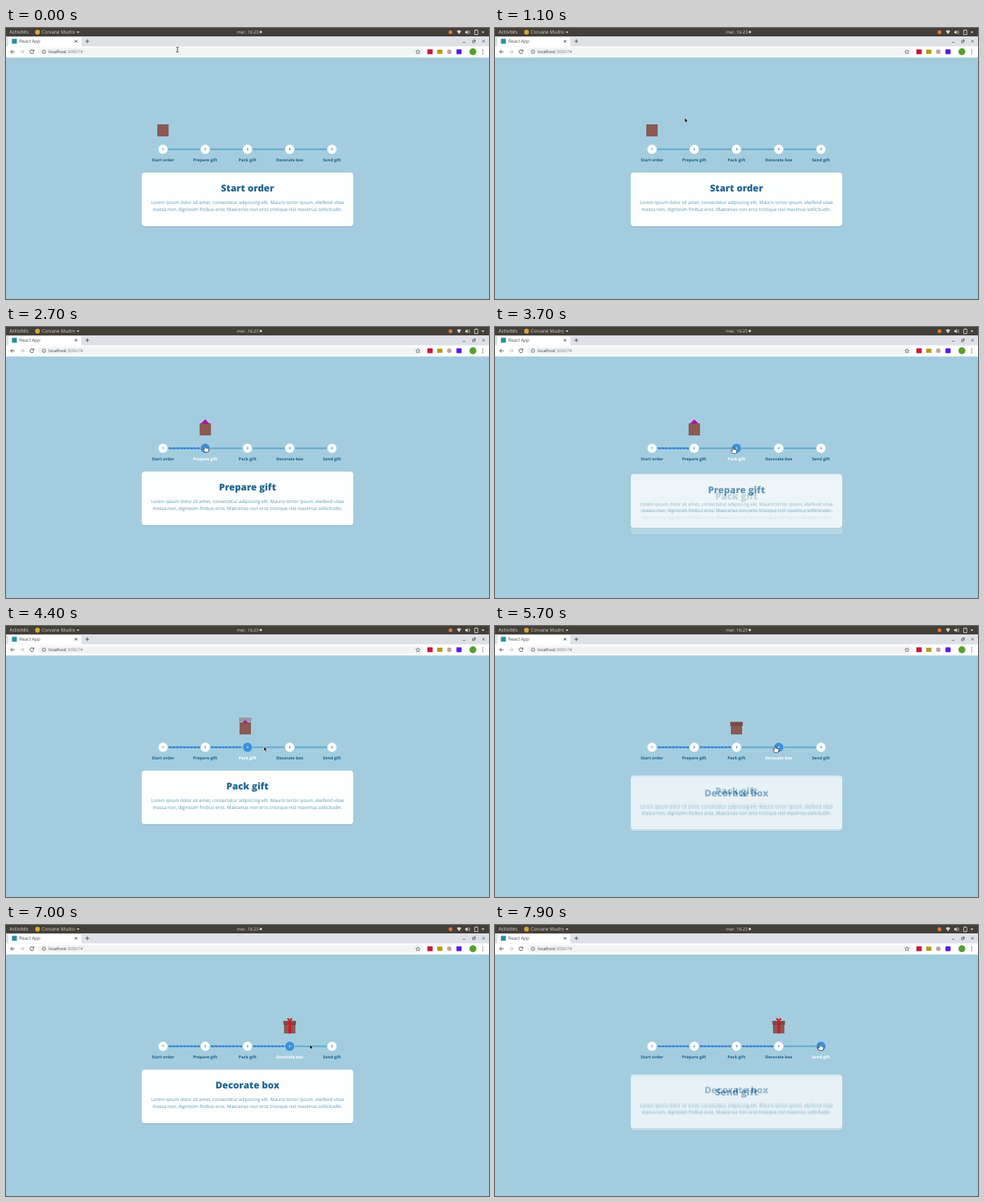
Recreate the animation shown at these times as an HTML page. Size 690 px wide and 388 px high, loop 8000 ms.

```html
<!DOCTYPE html>
<html lang="fr">
<head>
<meta charset="utf-8">
<title>Gift stepper</title>
<style>
  html, body { margin: 0; width: 100%; height: 100%; overflow: hidden; background: #a3cddf; }
  svg { display: block; width: 690px; height: 388px; }
  text { font-family: "Open Sans", "Noto Sans", sans-serif; text-rendering: geometricPrecision; }
  .mid { text-anchor: middle; }
  .panel { fill: #dfdbd2; font-size: 6.7px; font-weight: 500; }
  .title { font-size: 13.4px; font-weight: 800; fill: #226690; }
  .body { font-size: 6.55px; fill: #5795b3; }
  .label { font-size: 5.9px; font-weight: 700; fill: #1f6089; }
  .num { font-size: 4.6px; font-weight: 700; fill: #3f7c9c; }
  .dot { fill: #fdfefe; }
  .on .dot { fill: #3991e0; }
  .on .label { fill: #fff; }
  .on .num { fill: #dcecf8; }
  .line { fill: none; stroke: #4f5256; stroke-width: 1; }
</style>
</head>
<body>
<svg viewBox="0 0 690 388">
  <defs>
    <pattern id="stripes" width="5" height="4" patternUnits="userSpaceOnUse" patternTransform="skewX(35)">
      <rect width="5" height="4" fill="#2f80d0"/>
      <rect width="2" height="4" fill="#66a8e2"/>
    </pattern>
    <filter id="shadow" x="-5%" y="-10%" width="110%" height="125%">
      <feDropShadow dx="0" dy=".8" stdDeviation=".6" flood-color="#1d4d68" flood-opacity=".35"/>
    </filter>
  </defs>

  <rect width="690" height="388" fill="#a3cddf"/>

  <!-- desktop panel -->
  <rect width="690" height="12" fill="#433f39"/>
  <text class="panel" x="5" y="8.4" style="font-size:7px">Activités</text>
  <circle cx="45" cy="6" r="3.4" fill="#d9a52f"/>
  <text class="panel" x="51" y="8.4" style="font-size:6.6px">Corvane Mudro</text>
  <path d="M101 5h4l-2 2.6z" fill="#dfdbd2"/>
  <text class="panel" x="330" y="8.3" style="font-size:6.2px">mer. 16:23</text>
  <circle cx="364" cy="5.8" r="1.7" fill="#dfdbd2"/>
  <circle cx="635" cy="6" r="2.7" fill="#e8762c"/>
  <path d="M644 4.6a4.4 4.4 0 0 1 6.4 0L647.2 9z" fill="#d6d2ca"/>
  <path d="M656 4.8h1.5l2-1.8v6l-2-1.8H656z" fill="#dfdbd2"/>
  <path d="M660.6 4.2q1.3 1.8 0 3.6M661.8 3.2q2 2.8 0 5.6" fill="none" stroke="#dfdbd2" stroke-width=".6"/>
  <path d="M669.5 3.2h4.6v6.3h-4.6zM671 2.3h1.6" fill="none" stroke="#dfdbd2" stroke-width=".9"/>
  <path d="M679.3 5h4l-2 2.6z" fill="#dfdbd2"/>

  <!-- tab strip -->
  <rect y="12" width="690" height="14.2" fill="#dee1e6"/>
  <path d="M1 26.2q2.5 0 2.5-2.5V15.500q0-2.500 2.500-2.500H105q2.500 0 2.500 2.500v8.200q0 2.500 2.500 2.500z" fill="#fff"/>
  <rect x="8.500" y="15.500" width="7" height="7" fill="#2390a3"/>
  <text x="19" y="21.300" font-size="6.400" fill="#45494d">React App</text>
  <path class="line" d="M98.300 17.200l3.500 3.500m0-3.500l-3.500 3.500M113.500 19h5.400M116.200 16.300v5.400" stroke-width=".9"/>
  <path class="line" d="M652.500 20.500h3.600M666.500 18.200h2.800v2.800h-2.800zM667.700 17h2.800v2.800M680.400 17.200l3.500 3.500m0-3.500l-3.500 3.500" style="stroke-width:.8"/>

  <!-- toolbar -->
  <rect y="26.200" width="690" height="16" fill="#fff"/>
  <rect y="41.800" width="690" height=".5" fill="#d5dbde"/>
  <rect x="46" y="28.400" width="551" height="11.200" rx="5.600" fill="#f1f3f4"/>
  <path class="line" d="M12.300 34H6.700m2.600-2.700L6.700 34l2.600 2.700"/>
  <path class="line" d="M20.200 34h5.600m-2.600-2.700l2.600 2.700-2.600 2.700" style="stroke:#babcbe"/>
  <path class="line" d="M39.300 32.400a2.700 2.700 0 1 0 .4 2.200M39.800 30.900v2.200h-2.200"/>
  <circle class="line" cx="54.200" cy="34" r="2.500" style="stroke-width:.7"/>
  <path class="line" d="M54.200 33.700v1.600M54.200 32.400v.6" style="stroke-width:.7"/>
  <text x="61" y="36.200" font-size="6" fill="#303338">localhost<tspan fill="#7b7f84">:3000/?#</tspan></text>
  <path class="line" d="M588.500 31l.9 2 2.200.2-1.700 1.500.5 2.200-1.900-1.200-1.900 1.200.5-2.200-1.700-1.500 2.200-.2z" style="stroke-width:.7"/>
  <rect x="602" y="30.500" width="7.500" height="7" fill="#c5173f"/>
  <rect x="616" y="31" width="7.500" height="6" fill="#b79c16"/>
  <circle cx="633.300" cy="34" r="3.200" fill="#c3a2a0"/>
  <rect x="643.500" y="30.500" width="7.300" height="7" rx="1" fill="#5a18e6"/>
  <circle cx="667" cy="34" r="4.900" fill="#57a02c"/>
  <g fill="#55585c">
    <circle cx="681" cy="31.300" r=".8"/><circle cx="681" cy="34" r=".8"/><circle cx="681" cy="36.700" r=".8"/>
  </g>

  <!-- page -->
  <g id="gift">
    <path id="gem" d="M0 132.300l5.800 5.700-5.800 5.700-5.800-5.700z" fill="#bd08c2"/>
    <rect x="-7.600" y="138.300" width="15.200" height="16.500" fill="#8d5950" stroke="#754740" stroke-width=".7"/>
    <rect id="lid" x="-8.600" y="137.700" width="17.200" height="5" fill="#7d4a45" stroke="#6a3e3b" stroke-width=".5"/>
    <g id="ribbon" fill="#d5152c">
      <rect x="-1.900" y="137.400" width="3.800" height="17.900"/>
      <path d="M0 138l-3.400-2.400q-1-2 1-2.300Q-.6 133.300 0 136q.6-2.700 2.400-2.700 2 .3 1 2.300z"/>
    </g>
  </g>
  <g id="bars"></g>
  <g id="steps"></g>
  <g id="cards"></g>

  <g id="cursor" stroke-linejoin="round">
    <path d="M-1.700-3.500Q0-3.500 0-2.500 0-3.500 1.700-3.500M0-2.500v5M-1.700 3.500Q0 3.500 0 2.500 0 3.500 1.700 3.500" fill="none" stroke="#222" stroke-width=".9"/>
    <path d="M0 0v7l1.600-1.500 1.200 2.600 1.200-.6-1.200-2.500H5z" fill="#111" stroke="#fff" stroke-width=".6"/>
    <path d="M-.8 0Q0-.8.8 0V3l4 .9q.8.300.6 1.200L4.600 9H-.6L-3 5.600q-.2-1 .8-.9l1.400.9z" fill="#fff" stroke="#222" stroke-width=".7"/>
  </g>
</svg>
<script>
const LOOP = 8000, CARD_MS = 200, SHIFT = 16.5;
const NAMES = ['Start order', 'Prepare gift', 'Pack gift', 'Decorate box', 'Send gift'];
const CLICKS = [1612, 3668, 5650, 7850];
// time, x, y of the pointer's hot spot
const PATH = [
  [400, 245, 31], [1500, 282, 170], [2600, 282, 170], [3400, 340, 172], [3850, 340, 172],
  [4400, 368.5, 172.5], [4800, 400, 172], [6600, 400, 172], [7000, 434, 171], [7400, 464, 170.5]
];

const $ = id => document.getElementById(id);
const clamp = v => Math.min(1, Math.max(0, v));
const mix = (a, b, p) => a + (b - a) * p;
const stepX = i => 224.3 + 60.35 * i;
const smooth = p => p * p * (3 - 2 * p);
const show = (el, on) => el.setAttribute('visibility', on ? 'visible' : 'hidden');

// cubic-bezier(.25, .1, .25, 1)
function ease(x) {
  if (x <= 0 || x >= 1) return clamp(x);
  const bez = (a, b, s) => 3 * a * s * (1 - s) ** 2 + 3 * b * s * s * (1 - s) + s ** 3;
  let lo = 0, hi = 1;
  for (let i = 0; i < 20; i++) {
    const s = (lo + hi) / 2;
    if (bez(.25, .25, s) < x) lo = s; else hi = s;
  }
  return bez(.1, 1, lo);
}

$('steps').innerHTML = NAMES.map((name, i) => `<g>
  <circle class="dot" cx="${stepX(i)}" cy="173.700" r="6.600"/>
  <text class="num mid" x="${stepX(i)}" y="175.400">${i + 1}</text>
  <text class="label mid" x="${stepX(i)}" y="191.400">${name}</text></g>`).join('');

$('bars').innerHTML = CLICKS.map((_, i) => {
  const box = `x="${stepX(i) + 7.4}" y="172.400" height="2.600"`;
  return `<rect ${box} width="45.600" fill="#69afd0"/><rect class="fill" ${box} fill="url(#stripes)"/>`;
}).join('');

$('cards').innerHTML = NAMES.map(name => `<g>
  <rect x="194" y="207" width="302" height="77" rx="4.200" fill="#fdfefe" filter="url(#shadow)"/>
  <text class="title mid" x="345" y="234">${name}</text>
  <text class="body mid" x="345" y="252.300">Lorem ipsum dolor sit amet, consectetur adipiscing elit. Mauris tortor ipsum, eleifend vitae</text>
  <text class="body mid" x="345" y="261.700">massa non, dignissim finibus eros. Maecenas non eros tristique nisl maximus sollicitudin.</text></g>`).join('');

const steps = [...$('steps').children];
const cards = [...$('cards').children];
const fills = [...document.querySelectorAll('.fill')];
const shapes = [...$('cursor').children];

function pointer(t) {
  const n = PATH.findIndex(p => p[0] > t);
  if (n === 0) return PATH[0].slice(1);
  if (n < 0) return PATH[PATH.length - 1].slice(1);
  const a = PATH[n - 1], b = PATH[n];
  const p = smooth((t - a[0]) / (b[0] - a[0]));
  return [mix(a[1], b[1], p), mix(a[2], b[2], p)];
}

function place(el, y, opacity) {
  el.setAttribute('transform', `translate(0 ${y})`);
  el.setAttribute('opacity', opacity);
}

function render(t) {
  const step = CLICKS.filter(c => c <= t).length;
  const swap = step ? ease((t - CLICKS[step - 1]) / CARD_MS) : 1;
  const moves = CLICKS.map(c => ease((t - c - 200) / 750));
  const [gem, lid, ribbon] = CLICKS.map(c => smooth(clamp((t - c - 480) / 600)));

  cards.forEach((card, i) => {
    const incoming = i === step;
    const seen = incoming ? swap : i === step - 1 ? 1 - swap : 0;
    show(card, seen > 0);
    place(card, SHIFT * (1 - seen), seen);
  });

  const [x, y] = pointer(t);
  const over = steps.findIndex((_, i) => Math.hypot(x - stepX(i), y - 173.7) < 7.5);
  steps.forEach((s, i) => s.classList.toggle('on', i === over || (step > 0 && i === step)));
  const kind = y < 42 ? 0 : over < 0 ? 1 : 2;
  shapes.forEach((s, i) => show(s, i === kind));
  $('cursor').setAttribute('transform', `translate(${x} ${y})`);

  fills.forEach((f, i) => f.setAttribute('width', 45.6 * moves[i]));
  const travel = moves.reduce((a, b) => a + b, 0);
  $('gift').setAttribute('transform', `translate(${stepX(travel)} 0)`);
  place($('gem'), -8 * (1 - gem) + 6 * lid, gem);
  place($('lid'), -10 * (1 - lid), lid);
  place($('ribbon'), -8 * (1 - ribbon), ribbon);
}

function tick() {
  render(performance.now() % LOOP);
  requestAnimationFrame(tick);
}
tick();
</script>
</body>
</html>
```
